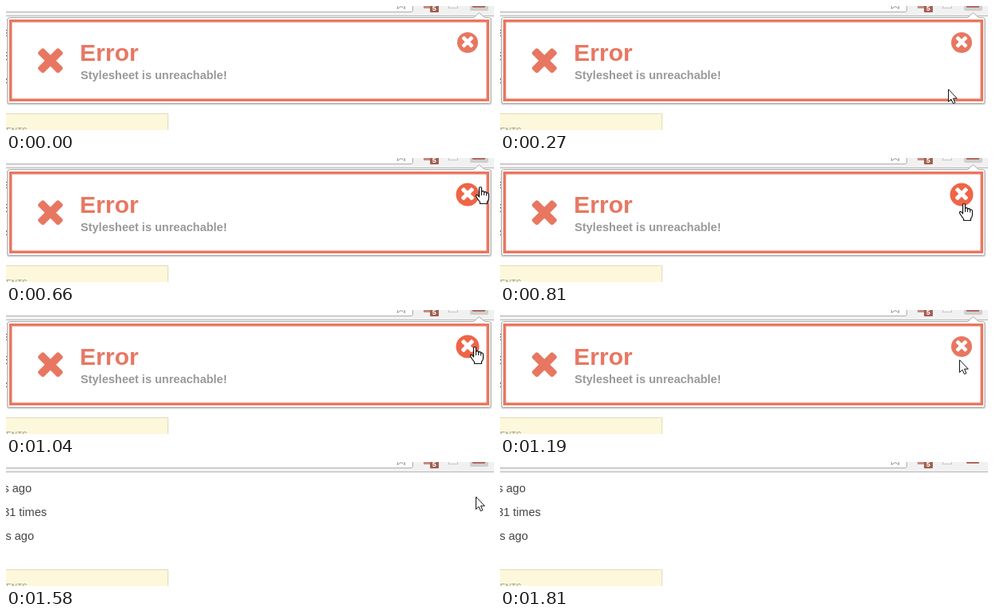
Recreate the animation shown at these times as an HTML page. Size 610x156 px, loop 2.74 s.

```html
<!DOCTYPE html>
<html lang="en">
<head>
<meta charset="utf-8">
<title>Error popup</title>
<style>
  html, body { margin: 0; width: 100%; height: 100%; overflow: hidden; background: #fff; }
  svg { display: block; width: 610px; height: 156px; }
  text { font-family: "Liberation Sans", Arial, sans-serif; }
  .page { font-size: 14.5px; fill: #444; text-anchor: end; }
  .title { font: bold 30px "Liberation Sans", Arial, sans-serif; fill: #e87761; }
  .note { font: bold 14.5px "Liberation Sans", Arial, sans-serif; fill: #999; }

  .popup, .pressed, .hover, .idle, .cursor, .arrow, .hand {
    animation: 2740ms step-end infinite;
  }
  .popup { animation-name: popup; }
  .pressed { animation-name: pressed; }
  .hover, .hand { animation-name: on-link; }
  .idle, .arrow { animation-name: off-link; }
  .cursor { animation-name: move; }

  @keyframes popup { 0% { opacity: 1 } 57.66%, 100% { opacity: 0 } }
  @keyframes pressed { 0% { opacity: 1 } 60.58%, 100% { opacity: 0 } }
  @keyframes on-link {
    0%, 32.11%, 40.87%, 57.66%, 100% { opacity: 0 }
    21.16%, 35.03%, 49.27% { opacity: 1 }
  }
  @keyframes off-link {
    0%, 32.11%, 40.87%, 57.66%, 100% { opacity: 1 }
    21.16%, 35.03%, 49.27% { opacity: 0 }
  }
  /* Enter from below, circle the close button, click, leave */
  @keyframes move {
    0% { transform: translate(558px, 170px) }
    6.93% { transform: translate(558px, 131px) }
    9.67% { transform: translate(560px, 104px) }
    12.4% { transform: translate(564px, 74px) }
    14.96% { transform: translate(566px, 55px) }
    21.16% { transform: translate(583px, 44px) }
    24.08% { transform: translate(593px, 36px) }
    26.64% { transform: translate(590px, 46px) }
    29.56% { transform: translate(580px, 57px) }
    32.11% { transform: translate(566px, 64px) }
    35.03% { transform: translate(575px, 55px) }
    37.95% { transform: translate(586px, 46px) }
    40.87% { transform: translate(574px, 62px) }
    43.61% { transform: translate(558px, 79px) }
    46.35% { transform: translate(572px, 62px) }
    49.27% { transform: translate(587px, 44px) }
    57.66% { transform: translate(587px, 43px) }
    60.58% { transform: translate(588px, 85px) }
    63.5% { transform: translate(589px, 135px) }
    66.05%, 100% { transform: translate(589px, 170px) }
  }
</style>
</head>
<body>
<svg viewBox="0 0 610 156">
  <defs>
    <path id="cross" transform="scale(.000842) translate(-896 -896)" d="M1490 1190q0 40-28 68l-136 136q-28 28-68 28t-68-28l-294-294-294 294q-28 28-68 28t-68-28l-136-136q-28-28-28-68t28-68l294-294-294-294q-28-28-28-68t28-68l136-136q28-28 68-28t68 28l294 294 294-294q28-28 68-28t68 28l136 136q28 28 28 68t-28 68l-294 294 294 294q28 28 28 68z"/>
  </defs>

  <!-- Page -->
  <rect width="610" height="156" fill="#fff"/>
  <text class="page" x="32" y="38">s ago</text>
  <text class="page" x="51" y="68">31 times</text>
  <text class="page" x="35" y="98">s ago</text>
  <rect x="-5.5" y="135.5" width="208" height="30" fill="#fdf7db" stroke="#e3dbbd"/>
  <text x="0" y="160.5" font-size="10" fill="#99968a">ENTS</text>

  <!-- Toolbar -->
  <rect width="610" height="12" fill="#f1f1f1"/>
  <rect y="12" width="610" height="1" fill="#b4b4b4"/>
  <rect x="-10.5" y="-20.5" width="519" height="28" rx="2.5" fill="#fff" stroke="#adadad"/>
  <path d="M489.5-2V3.5L494 .5l4.500 3V-2" fill="none" stroke="#999"/>
  <rect x="522" y="-8" width="10" height="11" fill="#c98a80"/>
  <rect x="530" y="-3" width="11" height="11" rx="1" fill="#a35f53"/>
  <text x="532.800" y="6" font-size="9" font-weight="bold" fill="#fff">5</text>
  <rect x="553.5" y="-8.500" width="11" height="11" fill="#f6f6f6" stroke="#c4c4c4"/>
  <rect class="pressed" x="580" y="-15" width="23" height="21" rx="2" fill="#cfcfcf"/>
  <rect x="583" y="-12" width="16" height="14" rx="1" fill="#b4695d"/>

  <!-- Popup -->
  <g class="popup">
    <rect x="1" y="15" width="606" height="109.500" rx="3" fill="#d2d2d2"/>
    <path d="M4.500 14.500H584.500L591.500 8.500 598.500 14.500H603.500Q606 14.500 606 17V120Q606 122.500 603.500 122.500H4.500Q2 122.500 2 120V17Q2 14.500 4.500 14.500Z" fill="#fff" stroke="#a9a9a9"/>
    <rect x="5.750" y="18.750" width="596.500" height="99.500" fill="#fff" stroke="#e87761" stroke-width="3.500"/>
    <use href="#cross" transform="translate(55.500 70.500) scale(31)" fill="#e87761"/>
    <text class="title" x="92.300" y="69">Error</text>
    <text class="note" x="93.300" y="92">Stylesheet is unreachable!</text>
    <g transform="translate(577 46)">
      <g class="idle">
        <circle r="13" fill="#e87761"/>
        <use href="#cross" transform="scale(14.500)" fill="#fff"/>
      </g>
      <g class="hover">
        <circle r="14.500" fill="#ef6547"/>
        <use href="#cross" transform="scale(16)" fill="#fff"/>
      </g>
    </g>
  </g>

  <!-- Pointer -->
  <g class="cursor" fill="#fff" stroke="#111" stroke-linejoin="round">
    <path class="arrow" d="M.5.800V16.500L4 13.200 6.400 18.700 8.900 17.600 6.500 12.200H11.300Z"/>
    <g class="hand">
      <path d="M-1.500 13V2Q-1.500.5 0 .5T1.500 2V7Q1.800 5.500 3.300 5.700T4.600 7.500Q5 6.300 6.400 6.600T7.600 8.300Q8.200 7.500 9.300 8T10.500 10V14.500Q10.500 17 8.500 19V21.500H-.5V19.500L-3.500 15.500-5.300 12.500Q-6 10.800-4.500 10.400-3.500 10.200-1.500 13Z" stroke-width="1.200"/>
      <path d="M1.500 7V11M4.600 7.500V11M7.600 8.300V11.500" fill="none"/>
    </g>
  </g>
</svg>
</body>
</html>
```
